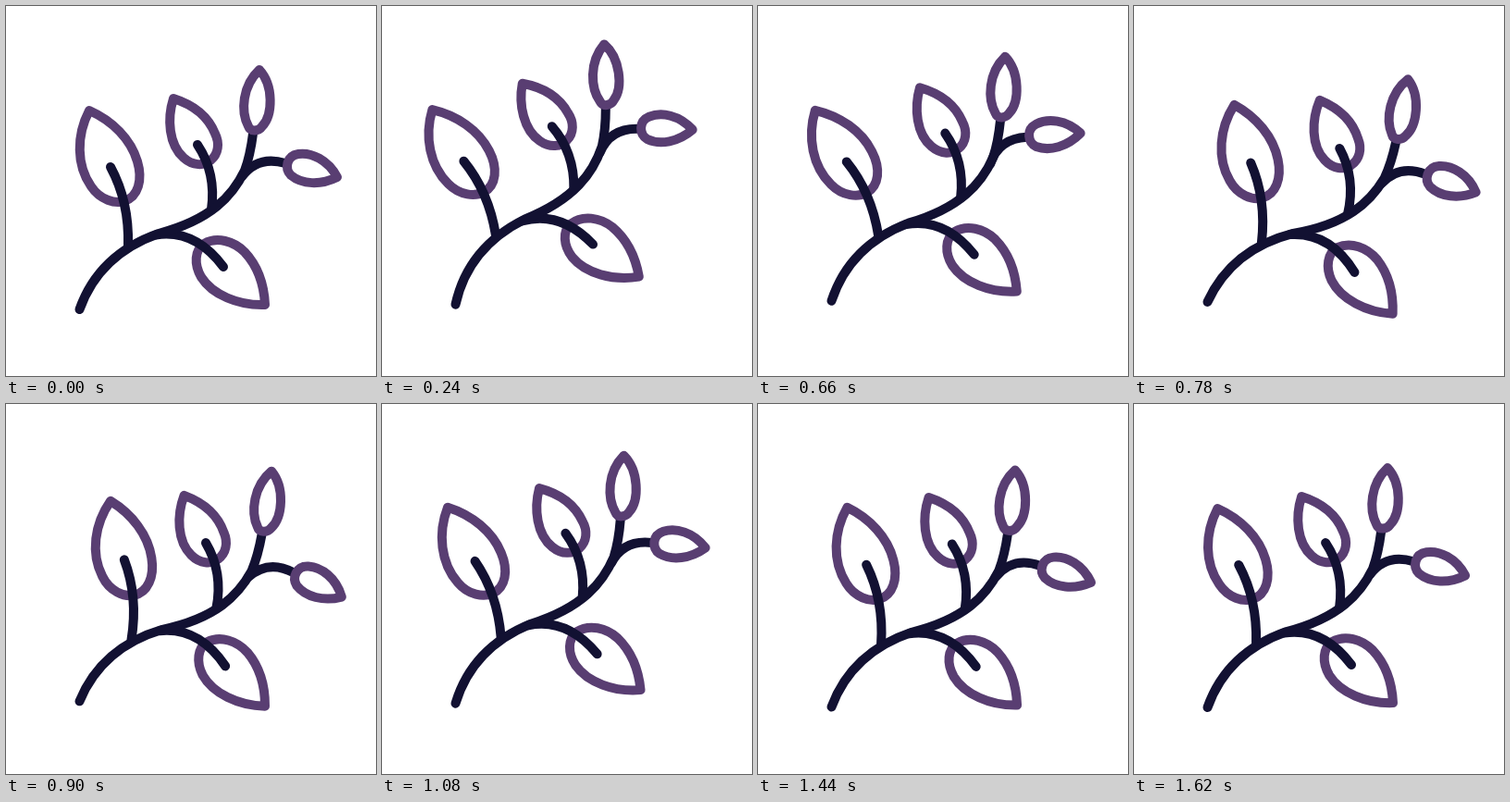
Recreate the animation shown at these times as an HTML page with a canvas. Size 400 by 400 pixels, loop 1.65 s.

```html
<!DOCTYPE html>
<html lang="en">
<head>
<meta charset="utf-8">
<title>Swaying branch</title>
<style>
  html, body { margin: 0; width: 100%; height: 100%; overflow: hidden; background: #fff; }
  canvas { display: block; width: 400px; height: 400px; }
</style>
</head>
<body>
<canvas id="stage"></canvas>
<script>
const SIZE = 400, LOOP = 1650, STEP = 30;
const DARK = '#121132', PURPLE = '#593e72';
const canvas = document.getElementById('stage');
const ctx = canvas.getContext('2d');
const scale = window.devicePixelRatio || 1;
canvas.width = canvas.height = SIZE * scale;

const ROOT = [79.5, 328];
const stem = new Path2D(
  'M79.5,328 C93,290 121,261.5 165,246 C222,231 245,205 258,178 C262,167 265,154 267,138');

const leaves = {
  left: {
    outline: 'M90,113 C76,140 76,172 92,195 C102,210 118,214 128,211 C143,206 148,188 142,168 C135,144 115,124 90,113Z',
    stalk: 'M113,174 C126,198 133,225 132,259',
    pivot: [132, 259], flex: 1
  },
  middle: {
    outline: 'M181,100 C174,122 176,150 192,164 C202,173 214,173 221,167 C230,160 231,148 226,138 C218,118 200,106 181,100Z',
    stalk: 'M207,150 C219,168 226,192 222,220'
  },
  lower: {
    outline: 'M280,323 C251,324 223,312 211,293 C203,279 204,264 214,257 C228,249 246,254 258,266 C272,281 279,302 280,323Z',
    stalk: 'M235,282 C220,262 197,242 162,247.5'
  },
  top: {
    outline: 'M274,69 C289.5,86 288.5,118 277,130 C273,136 264,136 262,130 C253.5,114 255.5,86 274,69Z'
  },
  right: {
    outline: 'M358,185 C348,166 330,158 316,160 C303,162 301,176 308,183 C320,193 340,194 358,185Z',
    stalk: 'M302,170 C285,165 268,167 255,184.5',
    pivot: [255, 184.5], flex: 1.92
  }
};
for (const leaf of Object.values(leaves)) {
  leaf.outline = new Path2D(leaf.outline);
  if (leaf.stalk) leaf.stalk = new Path2D(leaf.stalk);
}

// Keys are [time in ms, value]; angles are degrees counterclockwise.
const lift = [[0, 0], [460, -10], [1600, 0], [LOOP, 0]];
const sway = [[0, 0], [470, 13.9], [785, -5.1], [1130, 3.2], [1360, -1.1], [LOOP, 0]];
const follow = [[0, 0], [90, 0], [540, 14], [900, -4.6], [1140, 5], [1450, -1.2], [LOOP, 0]];

function valueAt(keys, time) {
  const next = keys.findIndex(key => key[0] > time);
  const [t0, v0] = keys[next - 1], [t1, v1] = keys[next];
  const u = (time - t0) / (t1 - t0);
  return v0 + (v1 - v0) * u * u * (3 - 2 * u);
}

function turn([x, y], degrees) {
  ctx.translate(x, y);
  ctx.rotate(-degrees * Math.PI / 180);
  ctx.translate(-x, -y);
}

function line(path, color) {
  ctx.strokeStyle = color;
  ctx.stroke(path);
}

function drawLeaf({ outline, stalk, pivot, flex }, bend, stalkOnTop) {
  ctx.save();
  if (pivot) turn(pivot, bend * flex);
  if (stalk && !stalkOnTop) line(stalk, DARK);
  line(outline, PURPLE);
  if (stalk && stalkOnTop) line(stalk, DARK);
  ctx.restore();
}

function draw(time) {
  const bend = valueAt(follow, time);
  ctx.setTransform(scale, 0, 0, scale, 0, 0);
  ctx.fillStyle = '#fff';
  ctx.fillRect(0, 0, SIZE, SIZE);
  ctx.lineWidth = 10;
  ctx.lineCap = ctx.lineJoin = 'round';
  ctx.translate(0, valueAt(lift, time));
  turn(ROOT, valueAt(sway, time));
  drawLeaf(leaves.left, bend, true);
  drawLeaf(leaves.middle, bend, true);
  drawLeaf(leaves.lower, bend, true);
  line(stem, DARK);
  drawLeaf(leaves.top, bend, false);
  drawLeaf(leaves.right, bend, false);
}

let start;
function tick(now) {
  start ??= now;
  const time = Math.max(0, now - start) % LOOP;
  draw(Math.floor(time / STEP) * STEP);
  requestAnimationFrame(tick);
}
draw(0);
requestAnimationFrame(tick);
</script>
</body>
</html>
```
